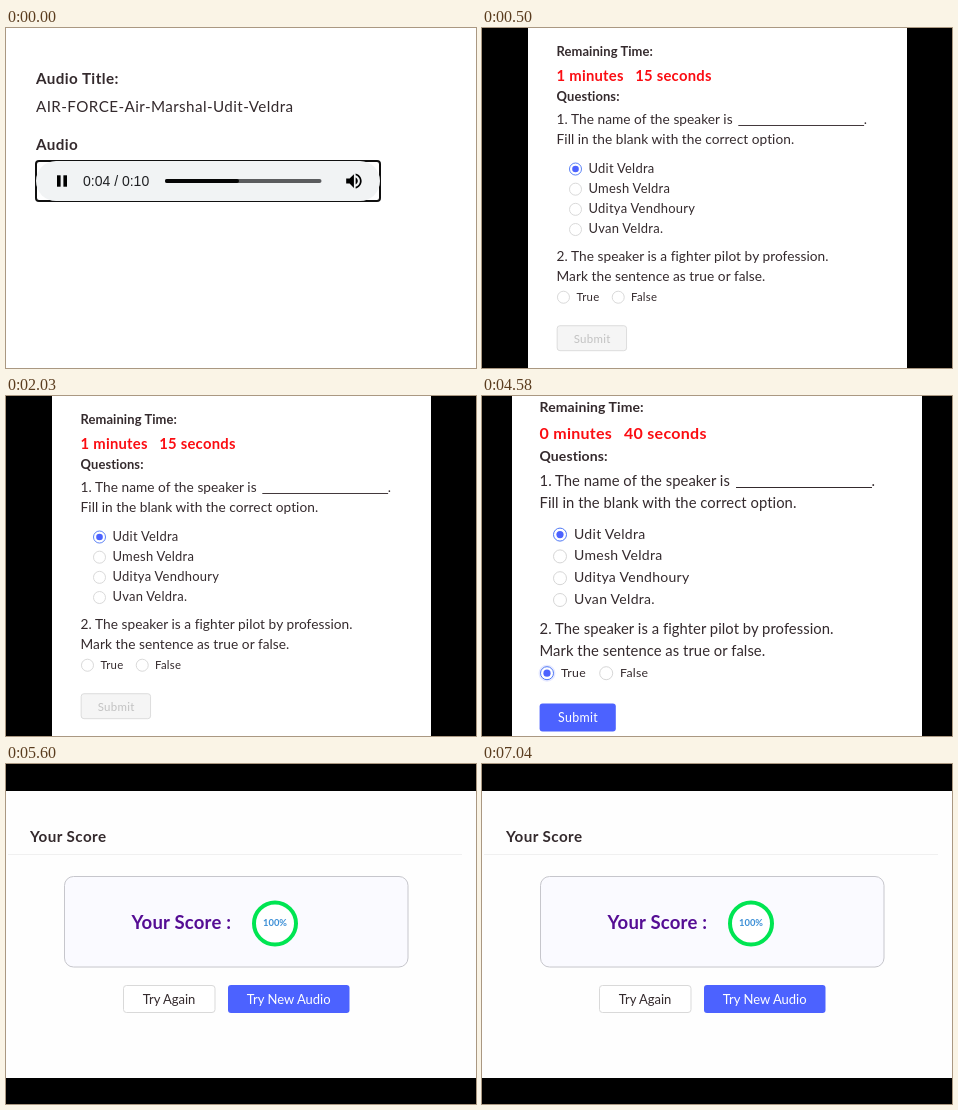
Animation of 470 by 340 pixels, one loop 8000 ms. Source, as an HTML page:

```html
<!DOCTYPE html>
<html lang="en">
<head>
<meta charset="utf-8">
<title>Audio quiz</title>
<style>
  html, body { margin: 0; width: 100%; height: 100%; overflow: hidden; background: #fff; }
  svg { display: block; width: 470px; height: 340px; }
  text { font-family: Lato, "Open Sans", sans-serif; fill: #342a2d; white-space: pre; }
  .label { font-weight: 700; font-size: 14px; letter-spacing: .1px; }
  .timer { font-weight: 700; font-size: 16px; letter-spacing: .28px; fill: #fb0d12; }
  .body { font-size: 14.8px; letter-spacing: .05px; }
  .option { font-size: 14px; letter-spacing: .3px; }
  .small { font-size: 12.3px; letter-spacing: .3px; }
  .wide { font-size: 15.2px; letter-spacing: .42px; }
  .bold { font-weight: 700; }
  .button { font-size: 13px; text-anchor: middle; }
  .submit { font-size: 12.4px; letter-spacing: .3px; text-anchor: middle; }
  .clock { font: 14px "Liberation Sans", Arial, sans-serif; fill: #202124; }
  .score { font-weight: 700; font-size: 18.5px; letter-spacing: .2px; fill: #550d94; }
  .percent { font-weight: 700; font-size: 9.4px; text-anchor: middle; fill: #3c8fd6; }
</style>
</head>
<body>
<svg id="stage" viewBox="0 0 470 340" xmlns="http://www.w3.org/2000/svg"></svg>
<script>
const LOOP = 8000;
const BLUE = "#4c62ff";
const stage = document.getElementById("stage");

const text = (x, y, cls, str, extra = "") =>
  `<text x="${x}" y="${y}" class="${cls}" ${extra}>${str}</text>`;

const rect = (x, y, w, h, fill, r = 0, extra = "") =>
  `<rect x="${x}" y="${y}" width="${w}" height="${h}" rx="${r}" fill="${fill}" ${extra}/>`;

const circle = (x, y, r, fill, extra = "") =>
  `<circle cx="${x}" cy="${y}" r="${r}" fill="${fill}" ${extra}/>`;

function radio(x, y, on, focus) {
  const glow = focus ? circle(x, y, 7.5, "none", 'stroke="#4c62ff" stroke-opacity=".14" stroke-width="2"') : "";
  const ring = circle(x, y, 6.5, "#fff", `stroke="${on ? "#4f78f5" : "#d6d6d6"}"`);
  return glow + ring + (on ? circle(x, y, 3.6, BLUE) : "");
}

function player() {
  const speaker = "M3 9v6h4l5 5V4L7 9H3zm13.5 3c0-1.77-1.02-3.29-2.5-4.03v8.05c1.48-.73 2.5-2.25 2.5-4.02z" +
    "M14 3.23v2.06c2.89.86 5 3.54 5 6.71s-2.11 5.85-5 6.71v2.06c4.01-.91 7-4.49 7-8.77s-2.99-7.86-7-8.77z";
  return rect(0, 0, 470, 340, "#fff") +
    text(30, 56, "wide bold", "Audio Title:") +
    text(30, 84, "wide", "AIR-FORCE-Air-Marshal-Udit-Veldra") +
    text(30, 122, "wide bold", "Audio") +
    rect(30, 133, 344, 40, "#fff", 3, 'stroke="#101010" stroke-width="2"') +
    rect(30, 133, 344, 40, "#f1f3f4", 20) +
    rect(51, 147.3, 3.6, 11.4, "#000") +
    rect(57.4, 147.3, 3.6, 11.4, "#000") +
    text(77, 158, "clock", "0:04 / 0:10") +
    rect(159, 151, 156.5, 4, "#5b5c5e", 2) +
    rect(159, 151, 74, 4, "#050505", 2) +
    `<path d="${speaker}" transform="translate(337.6 142.7) scale(.86)"/>`;
}

function quiz({ left, width, place, min, sec, secX, done }) {
  const names = ["Udit Veldra", "Umesh Veldra", "Uditya Vendhoury", "Uvan Veldra."];
  const options = names.map((name, i) =>
    radio(78, 138.6 + 21.8 * i, i === 0) +
    text(92, 142.6 + 21.7 * i, "option", name)).join("");
  const submit = done
    ? rect(57.6, 307.6, 76.2, 28, BLUE, 3)
    : rect(58.2, 308, 75, 27, "#f5f5f5", 3, 'stroke="#d9d9d9"');
  return rect(0, 0, 470, 340, "#000") + rect(left, 0, width, 340, "#fff") +
    `<g transform="${place}">` +
    text(57.5, 16, "label", "Remaining Time:") +
    text(57.5, 43, "timer", min + " minutes") +
    text(secX, 43, "timer", sec + " seconds") +
    text(57.5, 65, "label", "Questions:") +
    text(57.5, 90, "body", "1. The name of the speaker is") +
    rect(254, 91, 136, 1, "#342a2d") +
    text(389.5, 90, "body", ".") +
    text(57.5, 111.6, "body", "Fill in the blank with the correct option.") +
    options +
    text(57.5, 238, "body", "2. The speaker is a fighter pilot by profession.") +
    text(57.5, 259.7, "body", "Mark the sentence as true or false.") +
    radio(65, 277.2, done, done) + text(79, 281.3, "small", "True") +
    radio(124.2, 277.2, false) + text(138, 281.3, "small", "False") +
    submit +
    text(96, 326.4, "submit", "Submit", `style="fill:${done ? "#fff" : "#c2c2c2"}"`) +
    "</g>";
}

function result() {
  return rect(0, 0, 470, 340, "#000") + rect(0, 27, 470, 287, "#fefefe") +
    text(24, 78, "wide bold", "Your Score") +
    rect(2, 90, 454, 1, "#f0f0f0") +
    rect(58.5, 112.5, 343.5, 90.5, "#fafaff", 9, 'stroke="#c6c6cc"') +
    text(125.5, 165, "score", "Your Score :") +
    circle(269, 159.5, 21, "#fff", 'stroke="#00e552" stroke-width="4"') +
    text(269, 162.4, "percent", "100%") +
    rect(117.5, 221.5, 91.5, 27, "#fff", 3, 'stroke="#d9d9d9"') +
    text(163, 239.7, "button", "Try Again") +
    rect(222, 221, 121.5, 28, BLUE, 3) +
    text(282.7, 239.7, "button", "Try New Audio", 'style="fill:#fff"');
}

const scenes = [
  { start: 0, art: player() },
  { start: 500, art: quiz({ left: 46, width: 379, place: "translate(21.35 12.82) scale(.925)",
      min: 1, sec: 15, secX: 142.5, done: false }) },
  { start: 3050, art: quiz({ left: 30, width: 410, place: "translate(0 0)",
      min: 0, sec: 40, secX: 142, done: true }) },
  { start: 5600, art: result() }
];

stage.innerHTML = scenes.map(s => `<g>${s.art}</g>`).join("");
const groups = [...stage.children];

function draw(t) {
  const current = scenes.findLastIndex(s => t >= s.start);
  groups.forEach((g, i) => g.setAttribute("display", i === current ? "inline" : "none"));
}

const origin = performance.now();
function tick() {
  draw((performance.now() - origin) % LOOP);
  requestAnimationFrame(tick);
}
tick();
</script>
</body>
</html>
```
